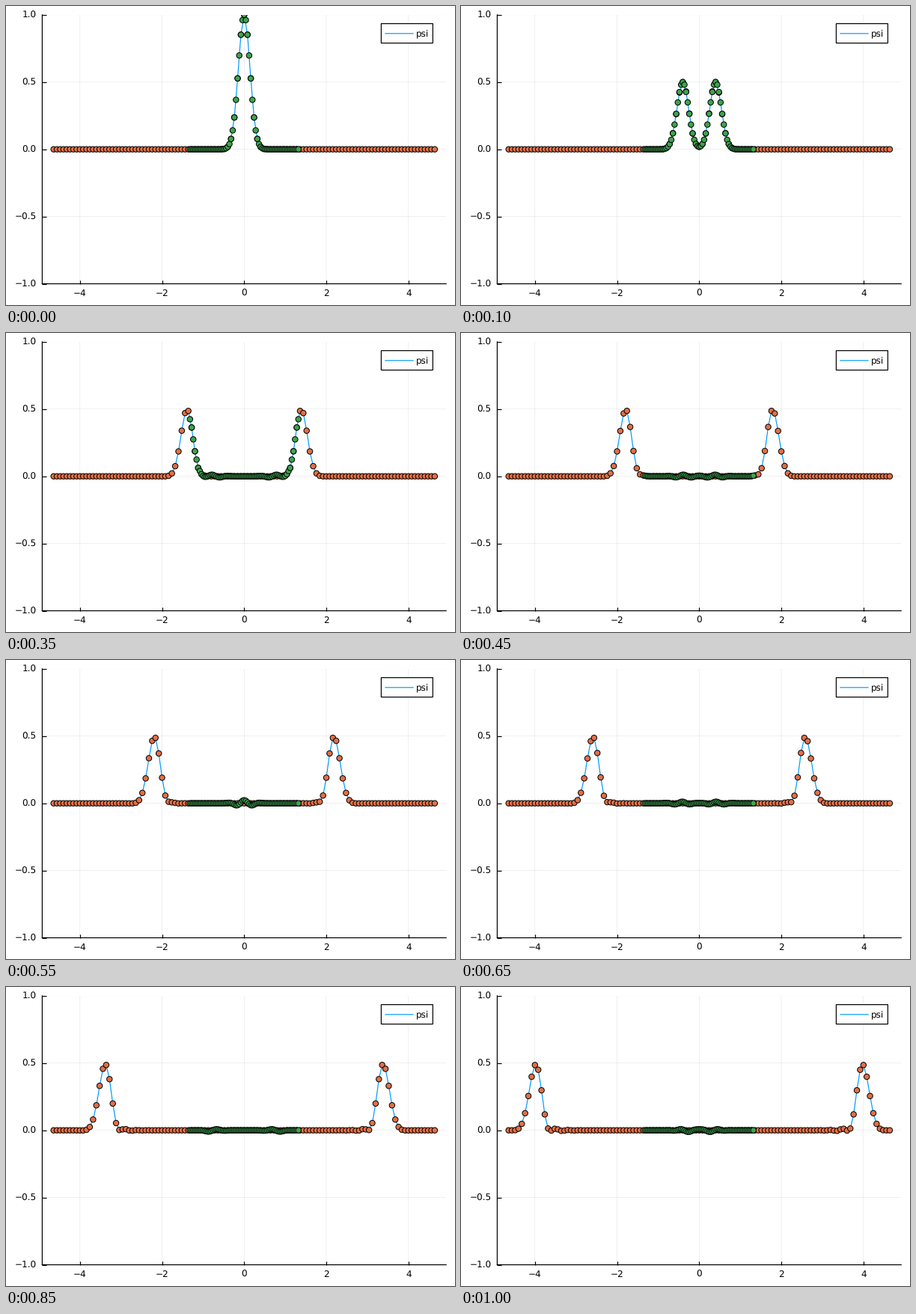
Recreate the animation shown at these times as a matplotlib script. Size 600 px wide and 400 px high, loop 1050 ms.

```python
import numpy as np
import matplotlib.pyplot as plt
from matplotlib.animation import FuncAnimation
from matplotlib.patches import Rectangle

W, H = 600, 400
FRAMES, INTERVAL = 21, 50
BLUE, ORANGE, GREEN = "#009AFA", "#E26F46", "#3DA44D"

# Wave equation on a coarse grid, which feeds the ends of a subcycled fine grid
DX = 0.08
STEPS = 10                      # coarse steps per frame
DT = 0.2 / STEPS
BUF = 8                         # buffer points at each end of the fine grid
xc = DX * np.arange(-58, 59)
xf = DX / 2 * np.arange(-33, 34)


def start(x):
    return np.array([np.exp(-(x / 0.2) ** 2), np.zeros_like(x)])


def rhs(u, h):
    psi, pi = u
    d = np.zeros_like(u)
    d[0, 2:-2] = pi[2:-2]
    d[1, 2:-2] = (16 * (psi[1:-3] + psi[3:-1]) - psi[:-4] - psi[4:]
                  - 30 * psi[2:-2]) / (12 * h * h)
    return d


def rk4(u, h, dt):
    a = rhs(u, h)
    b = rhs(u + dt / 2 * a, h)
    c = rhs(u + dt / 2 * b, h)
    d = rhs(u + dt * c, h)
    return u + dt / 6 * (a + 2 * b + 2 * c + d)


def fill_buffer(fine, coarse):
    out = np.array([np.interp(xf, xc, row) for row in coarse])
    out[:, BUF:-BUF] = fine[:, BUF:-BUF]
    return out


def advance(coarse, fine):
    new = rk4(coarse, DX, DT)
    for parent in (coarse, (coarse + new) / 2):
        fine = rk4(fill_buffer(fine, parent), DX / 2, DT / 2)
    return new, fill_buffer(fine, new)


def simulate():
    coarse, fine = start(xc), start(xf)
    states = [(coarse[0], fine[0])]
    for _ in range(FRAMES - 1):
        for _ in range(STEPS):
            coarse, fine = advance(coarse, fine)
        states.append((coarse[0], fine[0]))
    return states


states = simulate()

# At 72 dpi one point is one pixel
plt.rcParams.update({"font.family": "DejaVu Sans", "font.size": 12,
                     "text.hinting": "none", "path.snap": False})
fig = plt.figure(figsize=(W / 72, H / 72), dpi=72, facecolor="white")
L, R, T, B = 48.4, 588.2, 11.8, 371.6
ax = fig.add_axes([L / W, 1 - B / H, (R - L) / W, (B - T) / H])
ax.set(xlim=(-4.9184, 4.9184), ylim=(-1, 1),
       xticks=range(-4, 5, 2), yticks=np.linspace(-1, 1, 5))
ax.set_axisbelow(True)
ax.grid(color="black", alpha=0.1, lw=0.6)
ax.tick_params(direction="in", length=5.5, width=1.2,
               labelbottom=False, labelleft=False)
ax.spines[["top", "right"]].set_visible(False)
ax.spines[["left", "bottom"]].set_linewidth(1.2)


def label(x, y, s, ha):
    fig.text(x / W, 1 - y / H, s, ha=ha, va="baseline", zorder=9)


for v in range(-4, 5, 2):
    label((L + R) / 2 + v * (R - L) / 9.8368, 387.6,
          str(v).replace("-", "\u2212"), "center")
for v in np.linspace(-1, 1, 5):
    label(40.6, (T + B) / 2 - v * (B - T) / 2 + 4.4,
          f"{v:.1f}".replace("-", "\u2212"), "right")


def dots(x, color):
    # One colour per dot keeps subpixel positions
    return ax.scatter(x, 0 * x, s=7.4 ** 2, c=[color] * len(x),
                      edgecolors="black", linewidths=1, zorder=3)


line, = ax.plot([], [], color=BLUE, lw=1.2)
coarse_dots = dots(xc, ORANGE)
fine_dots = dots(xf, GREEN)

# Legend
fig.add_artist(Rectangle((501.4, H - 49.6), 69, 26, transform=None,
                         fc="white", ec="black", lw=1.2, zorder=7))
fig.add_artist(plt.Line2D([507, 544], [H - 36.8] * 2, transform=None,
                          color=BLUE, lw=1.2, zorder=8))
label(547.8, 40.6, "psi", "left")


def update(i):
    coarse, fine = states[i]
    line.set_data(xc, coarse)
    coarse_dots.set_offsets(np.column_stack([xc, coarse]))
    fine_dots.set_offsets(np.column_stack([xf, fine]))
    return line, coarse_dots, fine_dots


anim = FuncAnimation(fig, update, frames=FRAMES, interval=INTERVAL,
                     repeat=True, repeat_delay=0)
plt.show()
```
